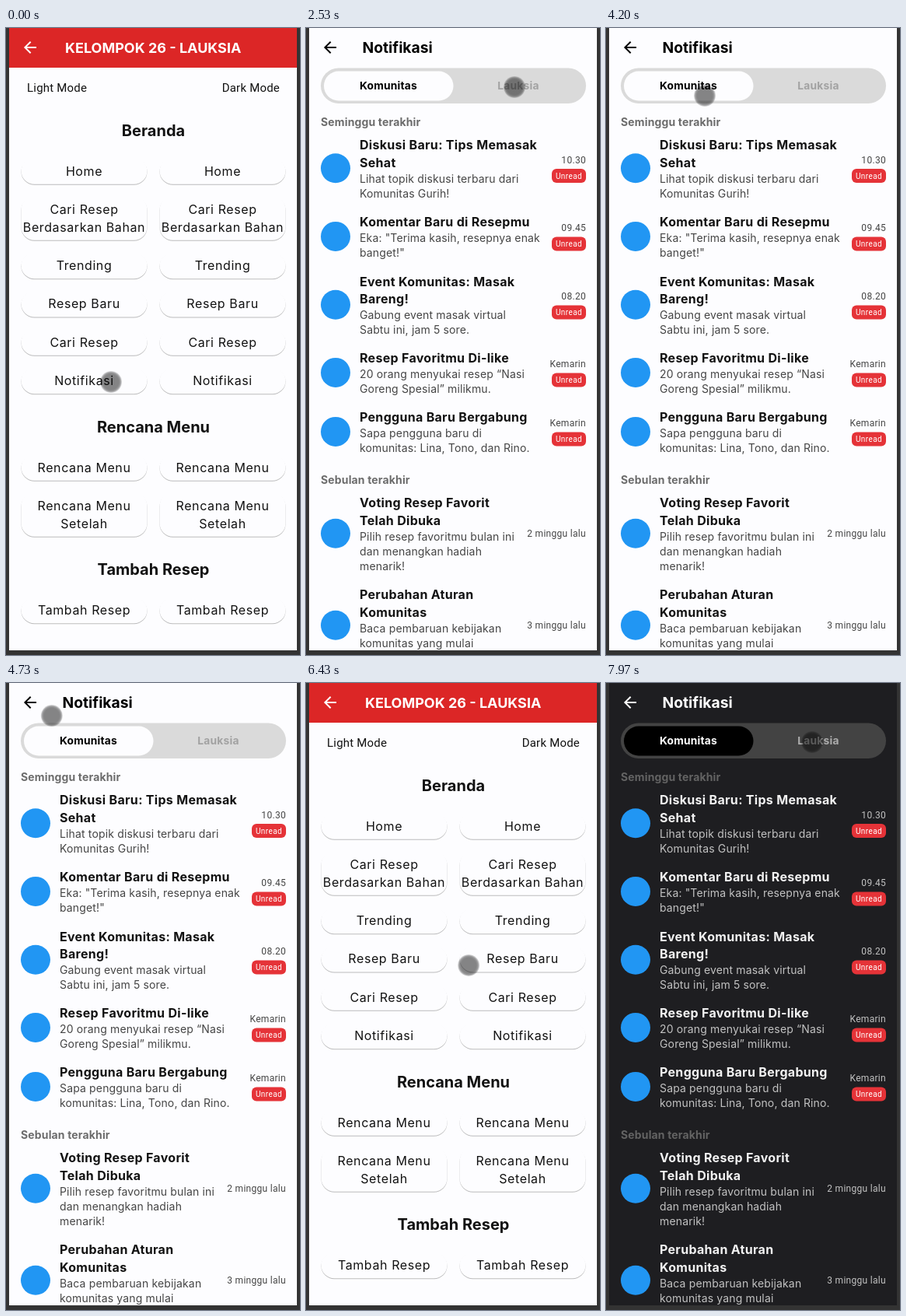
Recreate the animation shown at these times as an HTML page. Size 378 by 806 pixels, loop 8 s.

```html
<!DOCTYPE html>
<html lang="id">
<head>
<meta charset="utf-8">
<title>Notifikasi</title>
<style>
  html, body { margin: 0; width: 100%; height: 100%; overflow: hidden; background: #333; }
  svg { display: block; width: 100vw; height: 100vh; font-family: Inter, sans-serif; }
  text { white-space: pre; fill: var(--ink); }
  .light { --bg: #fdfdff; --ink: #121212; --body: #454545; --muted: #6c6c6c; --faded: #a0a0a0;
           --track: #dadada; --pill: #fdfdff; --on: #000; --off: #a2a2a2; }
  .dark { --bg: #1e1e21; --ink: #f2f2f2; --body: #c2c2c2; --muted: #636363; --faded: #757575;
          --track: #434343; --pill: #000; --on: #fff; --off: #adadad; }
  .bg { fill: var(--bg); }
  .bar { font: 700 18px Inter, sans-serif; fill: #fff; }
  .mode { font: 15px Roboto, sans-serif; letter-spacing: .2px; }
  .heading { font: 700 20px Inter, sans-serif; }
  .button { font: 16px Inter, sans-serif; letter-spacing: .6px; }
  .pill { fill: var(--bg); filter: drop-shadow(0 1px .6px #90909099); }
  .page { font: 700 19.3px Inter, sans-serif; fill: var(--on); }
  .tab { font: 700 13.8px Inter, sans-serif; letter-spacing: .2px;
         fill: color-mix(in srgb, var(--on) calc(var(--active) * 100%), var(--off)); }
  .section { font: 700 14px Inter, sans-serif; letter-spacing: .15px; fill: var(--muted); }
  .title { font: 700 16px Inter, sans-serif; letter-spacing: .3px; }
  .body { font: 14px Inter, sans-serif; letter-spacing: .15px; fill: var(--body); }
  .time { font: 12px Roboto, sans-serif; letter-spacing: .3px; fill: var(--body); }
  .badge { font: 10px Roboto, sans-serif; letter-spacing: .4px; fill: #fff; }
  .faded { fill: var(--faded); }
</style>
</head>
<body>
<svg id="stage" viewBox="0 0 378 806" preserveAspectRatio="none"></svg>
<script>
const ARROW = 'M20 11H7.83l5.59-5.59L12 4l-8 8 8 8 1.41-1.41L7.83 13H20v-2z';
const BELL = 'M12 22c1.1 0 2-.9 2-2h-4c0 1.1.89 2 2 2zm6-6v-5c0-3.07-1.64-5.64-4.5-6.32V4c0-.83-.67-1.5-1.5-1.5' +
  's-1.5.67-1.5 1.5v.68C7.63 5.36 6 7.92 6 11v5l-2 2v1h16v-1l-2-2z';

const text = (x, y, cls, str, anchor = 'start', attrs = '') =>
  `<text x="${x}" y="${y}" class="${cls}" text-anchor="${anchor}" ${attrs}>${str}</text>`;
const rect = (x, y, w, h, r, attrs) =>
  `<rect x="${x}" y="${y}" width="${w}" height="${h}" rx="${r}" ${attrs}/>`;
const icon = (path, x, y, fill) => `<path d="${path}" transform="translate(${x} ${y})" fill="${fill}"/>`;

// Menu page: headings [text, baseline] and buttons [centre y, ...lines]
const headings = [['Beranda', 139], ['Rencana Menu', 520], ['Tambah Resep', 703]];
const buttons = [
  [184, 'Home'], [244.5, 'Cari Resep', 'Berdasarkan Bahan'], [305.5, 'Trending'],
  [354.7, 'Resep Baru'], [404, 'Cari Resep'], [453.5, 'Notifikasi'],
  [565, 'Rencana Menu'], [625.5, 'Rencana Menu', 'Setelah'], [748.5, 'Tambah Resep']
];

function menuButton(cx, [cy, ...lines]) {
  const h = 33.5 + 23 * (lines.length - 1);
  return rect(cx - 81, cy - h / 2, 162, h, 17, 'class="pill"') +
    lines.map((line, i) =>
      text(cx, cy + 5.5 + 23 * (i - (lines.length - 1) / 2), 'button', line, 'middle')).join('');
}

const menuPage = () => `<g class="light">
  ${rect(4, 0, 370, 800, 0, 'class="bg"')}
  ${rect(4, 0, 370, 51, 0, 'fill="#dc2626"')}
  ${icon(ARROW, 19, 13, '#fff')}
  ${text(76, 32, 'bar', 'KELOMPOK 26 - LAUKSIA')}
  ${text(27, 82, 'mode', 'Light Mode')}
  ${text(352, 82, 'mode', 'Dark Mode', 'end')}
  ${headings.map(([str, y]) => text(189.5, y, 'heading', str, 'middle')).join('')}
  ${buttons.map(b => menuButton(100.5, b) + menuButton(278.5, b)).join('')}
</g>`;

// Notification rows: [first title centre, title lines, body lines, time, column centre for tab two]
const community = [
  [150, 'Diskusi Baru: Tips Memasak|Sehat', 'Lihat topik diskusi terbaru dari|Komunitas Gurih!', '10.30'],
  [249, 'Komentar Baru di Resepmu', 'Eka: "Terima kasih, resepnya enak|banget!"', '09.45'],
  [325.5, 'Event Komunitas: Masak|Bareng!', 'Gabung event masak virtual|Sabtu ini, jam 5 sore.', '08.20'],
  [424, 'Resep Favoritmu Di-like', '20 orang menyukai resep “Nasi|Goreng Spesial” milikmu.', 'Kemarin'],
  [500, 'Pengguna Baru Bergabung', 'Sapa pengguna baru di|komunitas: Lina, Tono, dan Rino.', 'Kemarin'],
  [610, 'Voting Resep Favorit|Telah Dibuka', 'Pilih resep favoritmu bulan ini|dan menangkan hadiah|menarik!', '2 minggu lalu'],
  [728, 'Perubahan Aturan|Komunitas', 'Baca pembaruan kebijakan|komunitas yang mulai|', '3 minggu lalu']
];
const appNews = [
  [131.5, 'Fitur Simpan Offline Hadir!', 'Sekarang kamu bisa simpan|resep favorit tanpa internet.', '11.35', 320.5],
  [207.5, 'Update Aplikasi Terbaru', 'Cek tampilan baru dengan|pencarian resep yang lebih|cepat.', '09.10', 320.5],
  [302.5, 'Resep Baru dari Chef|Rino', "Lihat resep 'Ayam Bakar|Sambal Matah' yang baru|dirilis!", 'Kemarin', 314.5],
  [420.5, 'Event Spesial:|Tantangan Resep|Ramadan', 'Ikuti challenge dan|menangkan voucher|belanja!', '2 hari lalu', 310],
  [561, 'Rekomendasi Resep|Minggu Ini', 'Kami pilihkan 5 resep|populer khusus untuk kamu.', '3 hari lalu', 310],
  [660, 'Favoritmu Jadi|Trending', "Resep 'Pisang Goreng Coklat'|milikmu masuk trending|minggu ini!", '4 hari lalu', 310]
];

function row([top, title, body, time, column], unread) {
  const titles = title.split('|'), bodies = body.split('|');
  const titleHeight = 22.8 * titles.length;
  const cy = top - 11.5 + (titleHeight + 19 * bodies.length) / 2;
  const badgeWidth = column ? 33 : 44;
  const badgeX = column ? column - badgeWidth / 2 : 360 - badgeWidth;
  const titleClass = column && !unread ? 'title faded' : 'title';
  return (column
      ? icon(BELL, 34, cy - 12, unread ? 'var(--on)' : 'var(--faded)')
      : `<circle cx="38" cy="${cy}" r="19" fill="#2196f3"/>`) +
    titles.map((s, i) => text(69, top + 6 + 22.8 * i, titleClass, s)).join('') +
    bodies.map((s, i) => text(69, top + titleHeight + 3 + 19 * i, 'body', s)).join('') +
    text(column || 360, cy + (unread ? -6.5 : 4.5), 'time', time, column ? 'middle' : 'end') +
    (unread
      ? rect(badgeX, cy + .7, badgeWidth, 18, 6, 'fill="#e53338"') +
        text(badgeX + badgeWidth / 2, cy + 13.3, 'badge', column ? 'Baru' : 'Unread', 'middle')
      : '');
}

const notificationPage = theme => `<g id="${theme}" class="${theme}">
  ${rect(4, 0, 370, 800, 0, 'class="bg"')}
  ${icon(ARROW, 19, 13, 'var(--on)')}
  ${text(72.5, 32, 'page', 'Notifikasi')}
  ${rect(19, 51.5, 341, 45.5, 22.7, 'fill="var(--track)"')}
  ${rect(23, 55.5, 166.5, 38, 19, 'class="indicator" fill="var(--pill)"')}
  ${text(106, 79, 'tab', 'Komunitas', 'middle', 'style="--active:calc(1 - var(--tab))"')}
  ${text(273, 79, 'tab', 'Lauksia', 'middle', 'style="--active:var(--tab)"')}
  <g clip-path="url(#panel)"><g class="panels">
    ${text(19, 126, 'section', 'Seminggu terakhir')}
    ${text(19, 586, 'section', 'Sebulan terakhir')}
    ${community.map((r, i) => row(r, i < 5)).join('')}
    <g transform="translate(341)">${appNews.map((r, i) => row(r, i < 5)).join('')}</g>
  </g></g>
</g>`;

const stage = document.getElementById('stage');
stage.innerHTML = `<defs>
  <clipPath id="screen">${rect(4, 0, 370, 800, 0, '')}</clipPath>
  <clipPath id="panel">${rect(19, 99, 341.5, 701, 0, '')}</clipPath>
  <radialGradient id="touch">
    <stop offset=".7" stop-opacity=".48"/>
    <stop offset=".85" stop-opacity=".4"/>
    <stop offset="1" stop-opacity=".12"/>
  </radialGradient></defs>
  <g clip-path="url(#screen)">${menuPage()}${notificationPage('light')}${notificationPage('dark')}</g>
  <circle id="pointer" r="14" fill="url(#touch)"/>`;

const lightPage = stage.querySelector('#light');
const darkPage = stage.querySelector('#dark');
const pointer = stage.querySelector('#pointer');

const LOOP = 8000;
// Pointer stops: [time, x, y]
const pointerPath = [
  [0, 135, 455], [1350, 135, 455], [2150, 268, 76], [2850, 268, 76], [3450, 127, 87],
  [4350, 127, 87], [4883, 42, 31], [5750, 42, 31], [6750, 262, 468], [7350, 262, 468],
  [7900, 265, 76], [LOOP, 265, 76]
];

const clamp = v => Math.min(1, Math.max(0, v));
const smooth = v => v * v * (3 - 2 * v);
const easeOut = v => 1 - (1 - v) ** 3;
const ramp = (t, start, ease) => ease(clamp((t - start) / 300));

function pointerAt(t) {
  const i = pointerPath.findIndex(p => p[0] > t);
  const [t0, x0, y0] = pointerPath[i - 1], [t1, x1, y1] = pointerPath[i];
  const k = smooth((t - t0) / (t1 - t0));
  return [x0 + (x1 - x0) * k, y0 + (y1 - y0) * k];
}

// Pages zoom in and out, with a fade much shorter than the zoom.
function showPage(page, shown, tab) {
  const opacity = clamp((shown - .4) * 4);
  page.style.display = opacity > 0 ? '' : 'none';
  page.style.opacity = opacity;
  page.style.setProperty('--tab', tab);
  const scale = .85 + .15 * shown;
  page.setAttribute('transform', `translate(189 403) scale(${scale}) translate(-189 -403)`);
  page.querySelector('.indicator').setAttribute('x', 23 + 167 * tab);
  page.querySelector('.panels').setAttribute('transform', `translate(${-341 * tab})`);
}

function draw(now) {
  const t = now % LOOP;
  showPage(lightPage, ramp(t, 350, easeOut) - ramp(t, 5050, easeOut), ramp(t, 2560, smooth) - ramp(t, 3720, smooth));
  showPage(darkPage, ramp(t, 7100, easeOut), 0);
  pointer.setAttribute('transform', `translate(${pointerAt(t)})`);
  requestAnimationFrame(draw);
}
requestAnimationFrame(draw);
</script>
</body>
</html>
```
